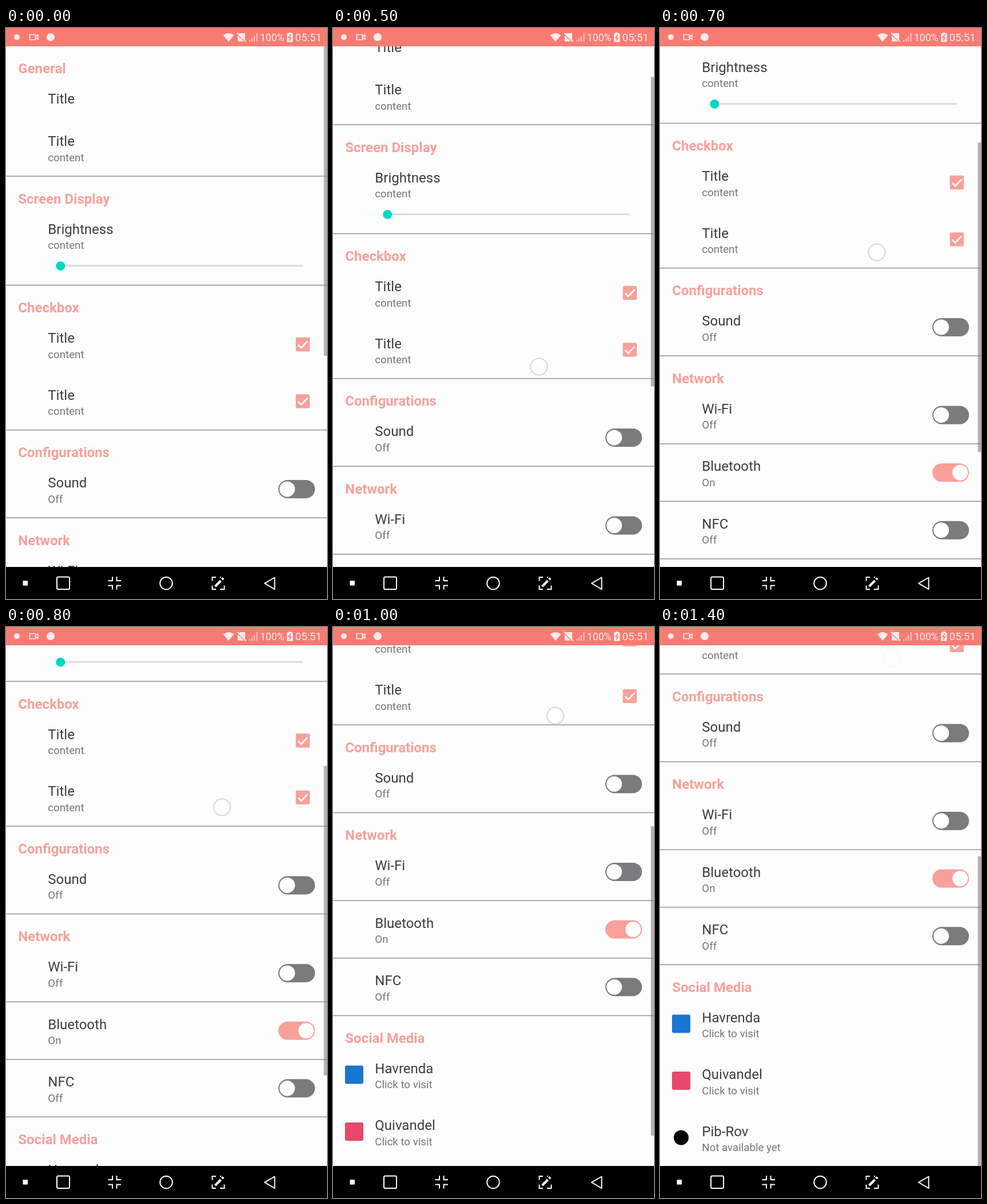
Write an HTML page that moves like this. It is 561 px wide and 998 px high and loops after 1.5 s.

```html
<!DOCTYPE html>
<html lang="en">
<head>
<meta charset="utf-8">
<title>Settings scroll</title>
<style>
  html, body { margin: 0; width: 100%; height: 100%; overflow: hidden; background: #fefdfe; }
  svg { display: block; width: 100vw; height: 100vh; font-family: Roboto, sans-serif; }
  .header { font-size: 24px; font-weight: 700; fill: #f9a09a; }
  .title { font-size: 24px; fill: #3d3d3f; }
  .note { font-size: 18.7px; fill: #767678; }
  .status { font-size: 18.5px; fill: #fff; fill-opacity: .85; }
  .line { fill: none; stroke: #fff; stroke-width: 2; }
</style>
</head>
<body>
<svg viewBox="0 0 561 998">
  <rect width="561" height="998" fill="#fefdfe"/>
  <g id="list"></g>
  <rect id="thumb" x="555.5" y="32" width="5.5" height="541" fill="#7d7d7f" fill-opacity=".58"/>
  <circle id="touch" r="14.6" fill="#fff" fill-opacity=".8" stroke="#d6dadf" stroke-width="2.2"/>

  <g id="statusBar">
    <rect width="561" height="32" fill="#f87b73"/>
    <g fill="#fff" fill-opacity=".85">
      <circle cx="19" cy="16" r="5"/>
      <circle cx="78" cy="16" r="7"/>
      <path d="M379.5 12.5Q389 5.5 398.500 12.500L389 24Z"/>
      <path d="M409 9H418V21L406.500 10.500ZM405 13L416 23.500H405Z"/>
      <path d="M493.500 9.500V8H498.500V9.500H501.500V24.500H491V9.500Z"/>
    </g>
    <path d="M404 8.500L419.500 24" class="line" stroke-width="1.5" opacity=".85"/>
    <path d="M498 11.500L494 17H498L495 22" fill="none" stroke="#f87b73" stroke-width="1.7"/>
    <path d="M41.500 11.500H51.500V20.500H41.500ZM52 15L56 12V20L52 17" class="line" style="stroke-width:1.6" opacity=".85"/>
    <path d="M426 24V21M430 24V18M434 24V14M438.500 24V9" class="line" style="stroke-width:2.5" opacity=".45"/>
    <text class="status" x="444" y="22.700" style="font-size:17.5px">100%</text>
    <text class="status" x="505.500" y="22.700">05:51</text>
  </g>

  <g id="navBar">
    <rect y="942" width="561" height="56"/>
    <rect x="29.500" y="966" width="8.500" height="8.500" rx="1" fill="#fff"/>
    <g class="line">
      <rect x="89" y="959.500" width="22" height="21.500" rx="2"/>
      <path d="M178.500 966H186V959M193.500 959V966H201M178.500 974.500H186V981.500M193.500 981.500V974.500H201"/>
      <circle cx="280" cy="970.500" r="10.800"/>
      <path d="M367 960H360.500V966.500M360.500 974.500V981H367M374 981H381.500V974.500M374 960H376"/>
      <path d="M365.500 976L375.500 966" stroke-width="4"/>
      <path d="M377.500 964L380 961.500" stroke-width="4"/>
      <path d="M469.500 960.500V981L452 970.700Z" stroke-linejoin="round"/>
    </g>
  </g>
</svg>
<script>
const PINK = '#f9a09a';
const $ = id => document.getElementById(id);

const text = (kind, x, y, value) => `<text class="${kind}" x="${x}" y="${y}">${value}</text>`;
const divider = y => `<rect y="${y - .7}" width="561" height="1.4" fill="#8d8b8f"/>`;
const header = (y, value) => text('header', 21.3, y + 8.5, value);

// Row positions are the vertical middle of the title's capitals.
const row = (y, title, note = '', extra = '') =>
  text('title', 73.3, y + 8.5, title) + text('note', 73.3, y + 35, note) +
  `<g transform="translate(0 ${y + 11.4})">${extra}</g>`;

const toggle = on =>
  `<rect x="476" y="-16" width="64" height="32" rx="16" fill="${on ? PINK : '#7b7b7d'}"/>
   <circle cx="${on ? 524.5 : 491.5}" r="13.5" fill="#fff"/>`;
const checkbox =
  `<rect x="506.5" y="-12.200" width="24.500" height="24.400" rx="2.500" fill="${PINK}"/>
   <path d="M510.500 .5L516 6L527 -5.500" class="line" style="stroke-width:2.700"/>`;
const slider =
  `<rect x="95" y="51.800" width="424" height="2.800" fill="#d9d9dd"/>
   <circle cx="95.300" cy="53.500" r="8" fill="#00d8c4"/>`;
const square = color => `<rect x="21" y="-16" width="32" height="32" rx="3" fill="${color}"/>`;
const disc = '<circle cx="37" r="13" fill="#000"/>';

$('list').innerHTML = [
  header(70.5, 'General'),
  row(123.5, 'Title'),
  row(197.5, 'Title', 'content'),
  header(298, 'Screen Display'),
  row(351, 'Brightness', 'content', slider),
  header(488.7, 'Checkbox'),
  row(541.6, 'Title', 'content', checkbox),
  row(641, 'Title', 'content', checkbox),
  header(741.6, 'Configurations'),
  row(794.5, 'Sound', 'Off', toggle(false)),
  header(895, 'Network'),
  row(948, 'Wi-Fi', 'Off', toggle(false)),
  row(1048.7, 'Bluetooth', 'On', toggle(true)),
  row(1149.3, 'NFC', 'Off', toggle(false)),
  header(1249.7, 'Social Media'),
  row(1302.6, 'Havrenda', 'Click to visit', square('#1976d2')),
  row(1402, 'Quivandel', 'Click to visit', square('#e8486a')),
  row(1501.6, 'Pib-Rov', 'Not available yet', disc),
  ...[259, 449.5, 702.6, 856, 1009.7, 1110.3, 1210.8].map(divider)
].join('');

// One pose per 100 ms after the initial rest: scroll offset, finger x, finger y.
const REST = 400, STEP = 100, LOOP = 1500;
const poses = [
  [0, 341, 713.5], [90, 360, 592], [208, 378.3, 466.7], [283, 379, 392],
  [354.5, 377.5, 315], [444, 382, 232], [531.5, 388.5, 155], [574.5, 395, 110.7],
  [604, 400, 80], [619, 404, 60], [620.5, 404.5, 54]
];

function draw(now) {
  const step = Math.floor((now % LOOP - REST) / STEP);
  const [scroll, x, y] = poses[Math.max(step, 0)];
  $('list').setAttribute('transform', `translate(0 ${-scroll})`);
  $('thumb').setAttribute('y', 32 + scroll * 541 / 910);
  $('touch').setAttribute('transform', `translate(${x} ${y})`);
  $('touch').setAttribute('opacity', step < 0 ? 0 : step === poses.length - 1 ? .15 : 1);
}

const start = performance.now();
function tick() {
  draw(performance.now() - start);
  requestAnimationFrame(tick);
}
tick();
</script>
</body>
</html>
```
